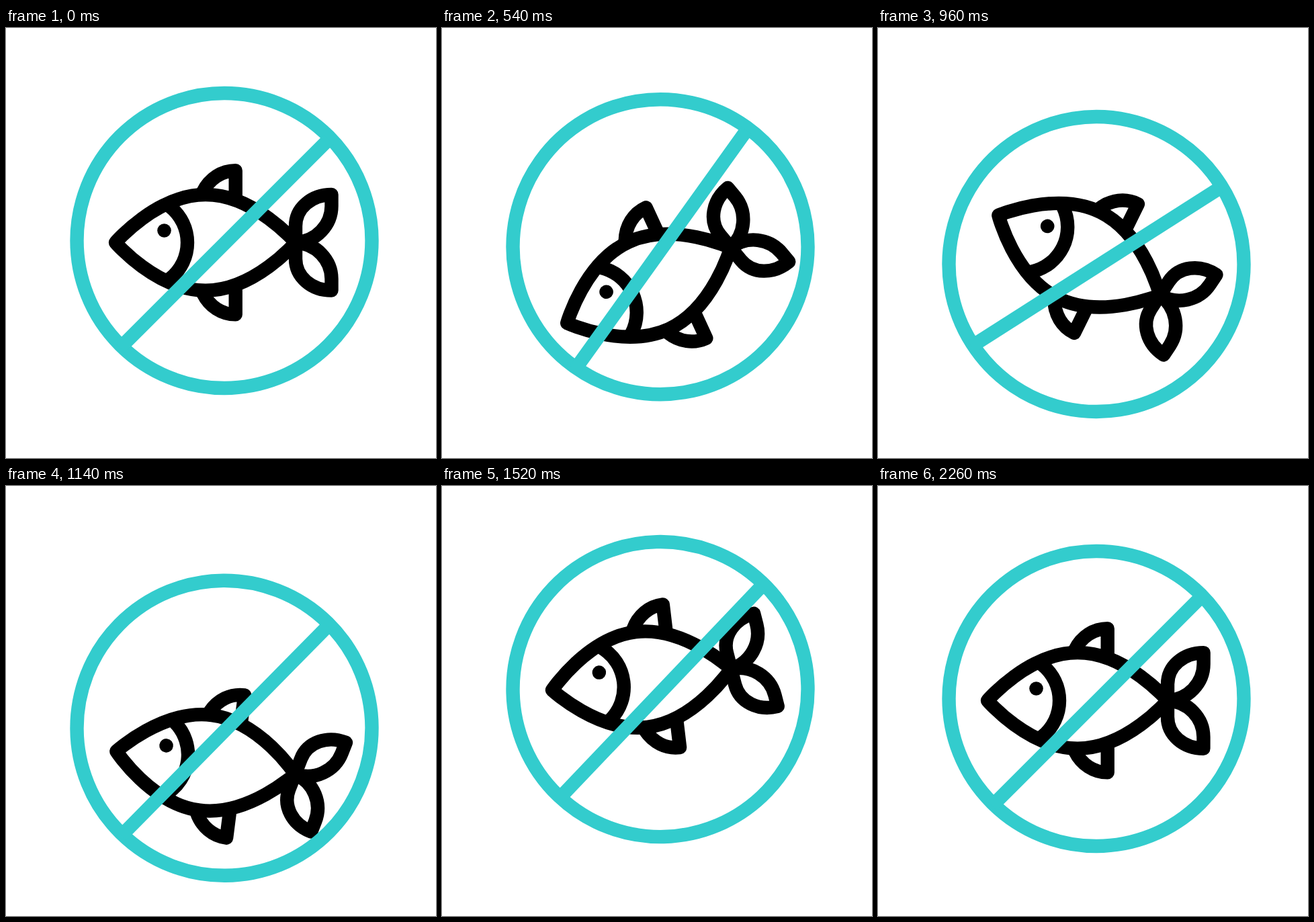
Recreate the animation shown at these times as an HTML page. Size 640 by 640 pixels, loop 2.4 s.

```html
<!DOCTYPE html>
<html lang="en">
<head>
<meta charset="utf-8">
<title>No fish</title>
<style>
  html, body { margin: 0; width: 100%; height: 100%; overflow: hidden; background: #fff; }
  svg { display: block; width: 100%; height: 100%; }
  .ink { fill: none; stroke: #000; stroke-width: 20.4; stroke-linecap: round; stroke-linejoin: round; }
  .sign { fill: none; stroke: #33cccd; stroke-width: 20.4; }
</style>
</head>
<body>
<svg viewBox="0 0 640 640">
  <g id="all">
    <g id="fish" class="ink">
      <path d="M163 319.3C163 319.3 224 248 297 248C370 248 431 319.3 431 319.3C431 319.3 370 390.7 297 390.7C224 390.7 163 319.3 163 319.3Z"/>
      <path stroke-linecap="butt" d="M243 265C279 293 279 346 243 374"/>
      <path stroke-linecap="butt" d="M293 244C303 224 321 212.3 341.7 212.3V252M293 394.6C303 414.6 321 426.4 341.7 426.4V386.6"/>
      <circle cx="235.5" cy="301.5" r="10.3" fill="#000" stroke="none"/>
      <g id="tail">
        <path id="lobe" d="M431 319.3V295C431 268 455 248 484.5 248V265C484.5 293 462 318 431 319.3Z"/>
        <use href="#lobe" transform="matrix(1 0 0 -1 0 638.6)"/>
      </g>
    </g>
    <g class="sign">
      <circle cx="325" cy="316.5" r="219.5"/>
      <path d="M480 166L170 476"/>
    </g>
  </g>
</svg>
<script>
  const LOOP = 2400, STEP = 20;
  const FISH_LAG = 103, TAIL_LAG = 230;

  // [time in ms, value]
  const bounce = [[0, 0], [364, 53.6], [718, -35.9], [1060, 53.5], [1412, -20.7], [1800, 15.1], [2120, 0]];
  const swing = [[0, 0], [382, -16.4], [890, 14.2], [1297, -7.7], [1715, 3.8], [2060, 0]];

  const el = id => document.getElementById(id);
  const all = el('all'), fish = el('fish'), tail = el('tail');

  function valueAt(keys, t) {
    if (t <= 0) return 0;
    for (let i = 1; i < keys.length; i++) {
      const [t0, a] = keys[i - 1], [t1, b] = keys[i];
      if (t < t1) {
        const p = (t - t0) / (t1 - t0);
        return a + (b - a) * p * p * (3 - 2 * p);
      }
    }
    return keys[keys.length - 1][1];
  }

  const turn = (t, x, y) => `rotate(${valueAt(swing, t)} ${x} ${y})`;
  const sway = t => `translate(0 ${valueAt(bounce, t)}) ${turn(t, 325, 316.5)}`;

  function draw(t) {
    all.setAttribute('transform', sway(t));
    fish.setAttribute('transform', sway(t - FISH_LAG));
    tail.setAttribute('transform', turn(t - TAIL_LAG, 431, 319.3));
  }

  let start;
  function tick(now) {
    if (start === undefined) start = now;
    draw(Math.floor(((now - start) % LOOP) / STEP) * STEP);
    requestAnimationFrame(tick);
  }
  draw(0);
  requestAnimationFrame(tick);
</script>
</body>
</html>
```
